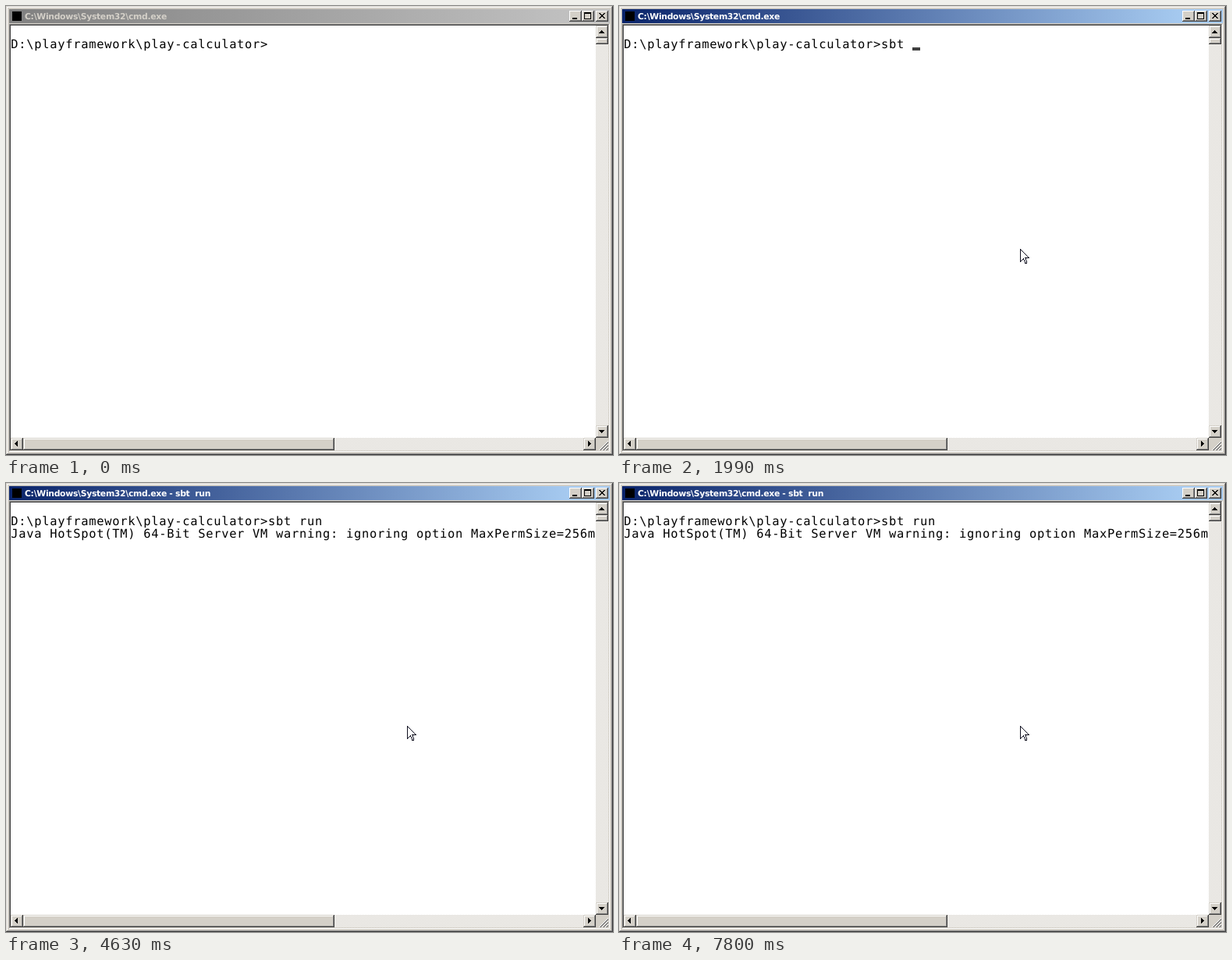
Write an HTML page with a canvas that moves like this. It is 778 px wide and 575 px high and loops after 8 s.

```html
<!DOCTYPE html>
<html lang="en">
<head>
<meta charset="utf-8">
<title>Console</title>
<style>
  html, body { margin: 0; width: 100%; height: 100%; overflow: hidden; background: #d4d0c8; }
  canvas, svg { position: absolute; left: 0; top: 0; display: block; }
  text { white-space: pre; text-rendering: geometricPrecision; }
  #title { font: bold 10.8px "DejaVu Sans", sans-serif; letter-spacing: -.3px; }
  #console text { font: 15.4px "DejaVu Sans Mono", monospace; letter-spacing: .728px; }
</style>
</head>
<body>
<canvas id="chrome" width="778" height="575"></canvas>
<svg width="778" height="575" viewBox="0 0 778 575">
  <text id="title" x="24" y="17"></text>
  <svg id="console" x="6" y="25" width="750" height="528">
    <text id="prompt" x=".3" y="29"></text>
    <text id="output" x=".3" y="45"></text>
    <rect id="caret" width="10" height="4" fill="#404040"/>
  </svg>
  <path id="mouse" d="M.5 .5V16.5L4.5 12.5L7 18.5H8.5L9 17L6.7 11.5H11.5Z"
    fill="#fff" stroke="#101020" stroke-linejoin="bevel" shape-rendering="crispEdges"/>
</svg>
<script>
const LOOP = 8000;
const PROMPT = 'D:\\playframework\\play-calculator>';
const WARNING = 'Java HotSpot(TM) 64-Bit Server VM warning: ignoring option MaxPermSize=256m';
const COMMAND = 'sbt run';
const FACE = '#d4d0c8', SHADE = '#808080', DARK = '#404040', LIGHT = '#fff';
const CELL = { w: 10, h: 16 };

// Moments in ms
const MOVE = 70, ARRIVE = 300, ACTIVE = 440, CARET = 980, RUN = 3070, WARN = 3380, IDLE = 4080;
const BLINK = 528;
const KEYS = [1140, 1450, 1760, 1990, 2170, 2300, 2600];

const $ = id => document.getElementById(id);
const ctx = $('chrome').getContext('2d');

function box(color, x, y, w, h) {
  ctx.fillStyle = color;
  ctx.fillRect(x, y, w, h);
}

// One-pixel frame: top and left in one colour, bottom and right in another
function edge(x, y, w, h, tl, br) {
  box(tl, x, y, w, 1);
  box(tl, x, y, 1, h);
  box(br, x, y + h - 1, w, 1);
  box(br, x + w - 1, y, 1, h);
}

function raised(x, y, w, h, outer = FACE, inner = LIGHT) {
  box(FACE, x, y, w, h);
  edge(x, y, w, h, outer, DARK);
  edge(x + 1, y + 1, w - 2, h - 2, inner, SHADE);
}

// Scroll button with a triangle pointing along (dx, dy)
function arrowButton(x, y, dx, dy) {
  raised(x, y, 16, 16);
  const tipX = x + 7 + 2 * dx, tipY = y + 7 + 2 * dy - (dy < 0 ? -1 : 0);
  for (let i = 0; i < 4; i++) {
    const size = 2 * i + 1;
    if (dy) box('#000', tipX - i, tipY - dy * i, size, 1);
    else box('#000', tipX - dx * i, tipY - i, 1, size);
  }
}

function checker() {
  const tile = document.createElement('canvas');
  tile.width = tile.height = 2;
  const t = tile.getContext('2d');
  t.fillStyle = FACE;
  t.fillRect(0, 0, 2, 2);
  t.fillStyle = LIGHT;
  t.fillRect(0, 0, 1, 1);
  t.fillRect(1, 1, 1, 1);
  return ctx.createPattern(tile, 'repeat');
}

function drawFrame() {
  raised(0, 0, 778, 575);
  edge(4, 23, 770, 548, SHADE, LIGHT);
  edge(5, 24, 768, 546, DARK, FACE);
  box(LIGHT, 6, 25, 750, 528);
}

function drawScrollbars() {
  const track = checker();
  box(track, 756, 25, 16, 528);
  box(track, 6, 553, 750, 16);
  arrowButton(756, 25, 0, -1);
  arrowButton(756, 537, 0, 1);
  arrowButton(6, 553, -1, 0);
  arrowButton(740, 553, 1, 0);
  raised(756, 41, 16, 8);
  raised(22, 553, 399, 16);

  box(FACE, 756, 553, 16, 16);
  for (let d = 1; d < 12; d++) {
    if (d % 4 === 0) continue;
    for (let i = 0; i <= d; i++) box(d % 4 === 3 ? LIGHT : SHADE, 771 - d + i, 568 - i, 1, 1);
  }
}

function drawTitleBar(active) {
  const fill = ctx.createLinearGradient(4, 0, 722, 0);
  fill.addColorStop(0, active ? '#0a246a' : '#808080');
  fill.addColorStop(1, active ? '#a6caf0' : '#c0c0c0');
  box(fill, 4, 4, 770, 18);
  box('#000', 8, 7, 12, 12);
  for (const x of [722, 738, 756]) raised(x, 6, 16, 14, LIGHT, FACE);
  box('#000', 726, 15, 6, 2);
  edge(741, 8, 9, 9, '#000', '#000');
  box('#000', 741, 9, 9, 1);
  for (let i = 0; i < 7; i++) {
    box('#000', 760 + i, 9 + i, 2, 1);
    box('#000', 766 - i, 9 + i, 2, 1);
  }
}

// While typing, every other key lands in the dark half of the blink
function caretShown(t, typed) {
  if (t >= IDLE) return Math.floor((t - IDLE) / BLINK) % 2 === 0;
  if (t >= RUN) return t < WARN;
  return t >= CARET && typed % 2 === 0;
}

function renderConsole(t) {
  const typed = KEYS.filter(k => k <= t).length;
  const row = t >= WARN ? 2 : t >= RUN ? 1 : 0;
  const col = row ? 0 : PROMPT.length + typed;
  $('prompt').textContent = PROMPT + COMMAND.slice(0, typed);
  $('output').textContent = t >= WARN ? WARNING : '';
  $('caret').setAttribute('visibility', caretShown(t, typed) ? 'visible' : 'hidden');
  $('caret').setAttribute('x', col * CELL.w);
  $('caret').setAttribute('y', 28 + row * CELL.h);
}

// The pointer arrives in four eased jumps
function renderMouse(t) {
  const step = Math.min(3, Math.floor(3 * (t - MOVE) / (ARRIVE - MOVE)));
  const left = (1 - Math.max(step, 0) / 3) ** 1.5;
  const x = Math.round(514 + 86 * left), y = Math.round(311 + 161 * left);
  $('mouse').setAttribute('visibility', t < MOVE ? 'hidden' : 'visible');
  $('mouse').setAttribute('transform', `translate(${x} ${y})`);
}

let wasActive = null;

function renderTitle(t) {
  const active = t >= ACTIVE;
  if (active !== wasActive) drawTitleBar(active);
  wasActive = active;
  $('title').setAttribute('fill', active ? LIGHT : FACE);
  $('title').textContent = 'C:\\Windows\\System32\\cmd.exe' + (t >= RUN ? ' - sbt  run' : '');
}

drawFrame();
drawScrollbars();
const start = performance.now();
function tick() {
  const t = (performance.now() - start) % LOOP;
  renderTitle(t);
  renderConsole(t);
  renderMouse(t);
  requestAnimationFrame(tick);
}
tick();
</script>
</body>
</html>
```
